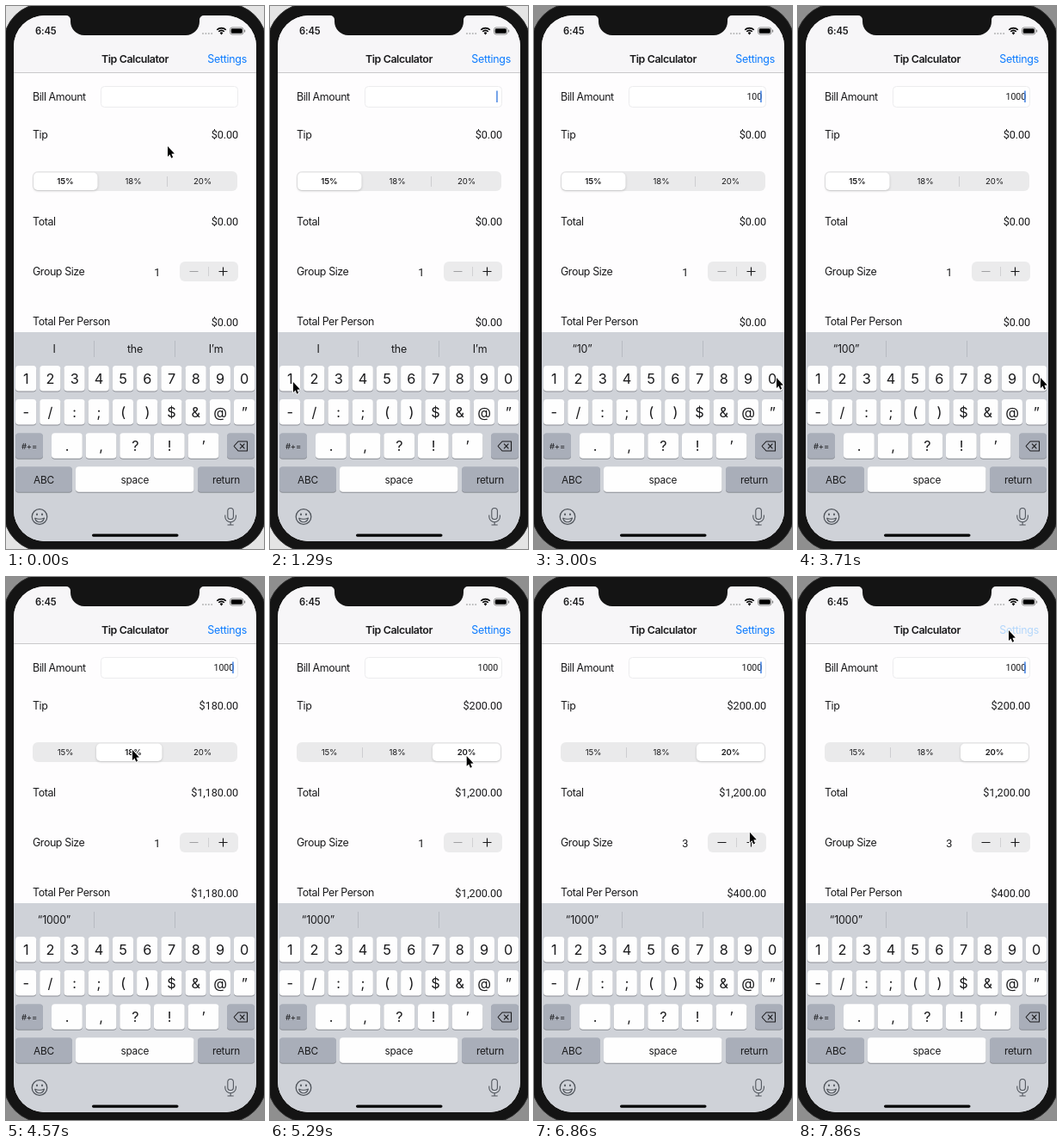
An HTML page with a canvas for the animation above (8 s loop, 300 px wide and 631 px high).

```html
<!DOCTYPE html>
<html lang="en">
<head>
<meta charset="utf-8">
<title>Tip Calculator</title>
<style>
html, body { margin: 0; width: 100%; height: 100%; overflow: hidden; background: #fff; }
canvas { display: block; width: 300px; height: 631px; }
</style>
</head>
<body>
<canvas id="stage"></canvas>
<script>
const W = 300, H = 631, LOOP = 8000, STEP = LOOP / 56;
const canvas = document.getElementById('stage');
const dpr = window.devicePixelRatio || 1;
canvas.width = W * dpr;
canvas.height = H * dpr;
const ctx = canvas.getContext('2d');

const INK = '#1a1a1c', BLUE = '#0a7aff', GREY_KEY = '#a9aeb9', BEZEL = '#141414';
const WORDS = 'Inter, Roboto, sans-serif';
const DIGITS = 'Roboto, Inter, sans-serif';

// Pointer stops: time, x, y
const PATH = [
  [0, 188, 163], [640, 188, 163], [1200, 27, 437], [1640, 27, 437],
  [2240, 282, 430], [2700, 282, 432], [3860, 282, 432], [4330, 147, 201],
  [4660, 147, 201], [4960, 228, 205], [5240, 228, 205], [5680, 251, 303],
  [6800, 251, 303], [7400, 248, 60], [7571, 247, 52], [7720, 245, 62]
];
const BILL = [[0, ''], [1500, '1'], [2430, '10'], [3000, '100'], [3560, '1000']];
const HINTS = [
  [0, ['I', 'the', 'I’m']], [1710, ['“1”']], [2720, ['“10”']],
  [3290, ['“100”']], [3950, ['“1000”']]
];
const RATES = [[0, 0], [4430, 0.18], [5140, 0.2]];
const GROUP = [[0, 1], [5850, 2], [6500, 3]];
const CHOICE = [[0, 0], [4290, 1], [5000, 2]];
const THUMBS = [[32, 106.5], [105, 181.5], [189, 268]];
const SLIDE = 240;

const clamp = v => Math.max(0, Math.min(1, v));
const ease = v => v * v * (3 - 2 * v);
const mix = (a, b, k) => a + (b - a) * k;
const lastIndex = (list, t) => list.filter(e => e[0] <= t).length - 1;
const valueAt = (list, t) => list[lastIndex(list, t)][1];
const money = v => '$' + v.toLocaleString('en-US', { minimumFractionDigits: 2, maximumFractionDigits: 2 });

function box(x, y, w, h, r, fill, stroke) {
  ctx.beginPath();
  ctx.roundRect(x, y, w, h, r);
  if (fill) { ctx.fillStyle = fill; ctx.fill(); }
  if (stroke) { ctx.strokeStyle = stroke; ctx.lineWidth = 1; ctx.stroke(); }
}

// y is the middle of the capital letters
function text(str, x, y, { size = 12.4, weight = 400, align = 'left', color = INK, track = -0.032, font = WORDS } = {}) {
  ctx.font = `${weight} ${size}px ${font}`;
  ctx.letterSpacing = track * size + 'px';
  ctx.textAlign = align;
  ctx.fillStyle = color;
  ctx.fillText(str, x, y + size * 0.36);
}

const number = (str, x, y, size = 12.7) =>
  text(str, x, y, { size, align: 'right', track: -0.008, font: DIGITS });

function line(color, width, ...pts) {
  ctx.beginPath();
  pts.forEach(([x, y]) => ctx.lineTo(x, y));
  ctx.strokeStyle = color;
  ctx.lineWidth = width;
  ctx.stroke();
}

function drawBody(t) {
  ctx.fillStyle = t < 1420 ? '#e4e4e4' : '#8f8f8f';
  ctx.fillRect(0, 0, W, H);
  box(-3, -3, 306, 637, 47, BEZEL, '#333');
}

function drawNotch() {
  ctx.beginPath();
  ctx.moveTo(70, 10);
  ctx.lineTo(70, 11);
  ctx.arcTo(75, 11, 75, 16, 5);
  ctx.arcTo(75, 34, 91, 34, 16);
  ctx.arcTo(225, 34, 225, 18, 16);
  ctx.arcTo(225, 11, 230, 11, 5);
  ctx.lineTo(230, 10);
  ctx.fillStyle = BEZEL;
  ctx.fill();
}

function drawStatus() {
  text('6:45', 34, 29.3, { size: 11.2, weight: 600, track: -0.01 });
  for (let i = 0; i < 4; i++) box(228 + i * 3.4, 31, 2, 2, 1, '#b4b4b6');
  ctx.strokeStyle = '#000';
  ctx.lineWidth = 1.7;
  for (const r of [4.6, 7.4]) {
    ctx.beginPath();
    ctx.arc(250.5, 33, r, -Math.PI * 0.75, -Math.PI * 0.25);
    ctx.stroke();
  }
  ctx.beginPath();
  ctx.moveTo(250.5, 33.4);
  ctx.arc(250.5, 33, 2.6, -Math.PI * 0.75, -Math.PI * 0.25);
  ctx.fillStyle = '#000';
  ctx.fill();
  box(260.5, 25, 15.5, 8, 2.4, null, '#8c8c8c');
  box(261.7, 26.2, 13.1, 5.6, 1.4, '#000');
  box(277, 27.5, 1.2, 3, 0.6, '#8c8c8c');
}

function drawNav(t) {
  ctx.fillStyle = '#f7f6f8';
  ctx.fillRect(9, 11, 282, 66);
  ctx.fillStyle = '#c9c9cb';
  ctx.fillRect(9, 77, 282, 1);
  drawStatus();
  text('Tip Calculator', 150, 61.3, { weight: 600, align: 'center' });
  text('Settings', 280, 61.3, { align: 'right', color: t < 7700 ? BLUE : '#b4d7fb', track: -0.02 });
}

function drawField(t) {
  box(110.5, 93.5, 159, 24, 4, '#fff', '#ececee');
  number(valueAt(BILL, t), 265, 105.3, 10.6);
  const typed = lastIndex(BILL, t);
  const start = typed ? BILL[typed][0] : 330;
  const phase = (t - start + 120 + 1000) % 1000;
  ctx.globalAlpha = clamp(Math.min(phase / 80, (680 - phase) / 120));
  ctx.fillStyle = '#3f7fe0';
  ctx.fillRect(263.2, 98.5, 1.5, 13.5);
  ctx.globalAlpha = 1;
}

function drawSegments(t) {
  box(31, 192, 238, 23, 6, '#eaeaeb');
  const i = lastIndex(CHOICE, t);
  const from = THUMBS[Math.max(0, i - 1)], to = THUMBS[i];
  const k = i ? ease(clamp((t - CHOICE[i][0]) / SLIDE)) : 1;
  const left = mix(from[0], to[0], k), right = mix(from[1], to[1], k);
  if (i === 2) line('#cdcdd0', 1, [107.5, 198], [107.5, 210]);
  if (i === 0) line('#cdcdd0', 1, [187.5, 198], [187.5, 210]);
  ctx.save();
  ctx.shadowColor = 'rgba(0,0,0,.18)';
  ctx.shadowBlur = 3 * dpr;
  ctx.shadowOffsetY = dpr;
  box(left, 193.5, right - left, 20.5, 5, '#fff');
  ctx.restore();
  ['15%', '18%', '20%'].forEach((s, n) =>
    text(s, [69, 148, 228.5][n], 204, { size: 9.6, weight: n === i ? 600 : 400, align: 'center', track: -0.01 }));
}

function drawStepper(t, count) {
  box(202, 297, 68, 23, 6, '#ebebec');
  const pressed = (t > 5800 && t < 6090) || (t > 6420 && t < 6700);
  if (pressed) box(235.5, 297, 34.5, 23, 6, '#c3c3c5');
  else line('#d0d0d2', 1, [235.5, 303], [235.5, 314]);
  line(count > 1 ? INK : '#a0a0a2', 1.2, [213.5, 308.5], [223.5, 308.5]);
  line(INK, 1.2, [247.5, 308.5], [257.5, 308.5]);
  line(INK, 1.2, [252.5, 303.5], [252.5, 313.5]);
}

function drawForm(t) {
  const rate = valueAt(RATES, t), count = valueAt(GROUP, t);
  const tip = 1000 * rate, total = rate ? 1000 + tip : 0;
  const row = (label, y, amount) => {
    text(label, 31, y);
    if (amount !== undefined) number(money(amount), 270, y);
  };
  row('Bill Amount', 105.6);
  row('Tip', 149.4, tip);
  row('Total', 250.9, total);
  row('Group Size', 309);
  row('Total Per Person', 367, total / count);
  number(String(count), 179.2, 309);
  drawField(t);
  drawSegments(t);
  drawStepper(t, count);
}

function key(x, y, w, label, fill = '#fefefe', size = 16.3) {
  box(x, y + 1, w, 29.5, 3.8, '#8b8e95');
  box(x, y, w, 29.5, 3.8, fill);
  text(label, x + w / 2, y + 15, { size, align: 'center', track: -0.02 });
}

function drawBackspace() {
  ctx.lineJoin = 'round';
  line(INK, 1.1, [265, 511.5], [270, 506], [280.5, 506], [280.5, 517], [270, 517], [265, 511.5]);
  line(INK, 1.1, [272, 508.7], [277.4, 514.3]);
  line(INK, 1.1, [277.4, 508.7], [272, 514.3]);
}

function drawBottomIcons() {
  ctx.strokeStyle = ctx.fillStyle = '#50555c';
  ctx.lineWidth = 1.3;
  ctx.beginPath();
  ctx.arc(39, 593.5, 8.8, 0, 7);
  ctx.stroke();
  for (const x of [36, 42]) {
    ctx.beginPath();
    ctx.ellipse(x, 590.8, 1, 1.4, 0, 0, 7);
    ctx.fill();
  }
  ctx.beginPath();
  ctx.moveTo(33.5, 595);
  ctx.quadraticCurveTo(39, 597.6, 44.5, 595);
  ctx.quadraticCurveTo(43, 599.8, 39, 599.8);
  ctx.quadraticCurveTo(35, 599.8, 33.5, 595);
  ctx.lineWidth = 1.1;
  ctx.stroke();

  box(257.8, 583.5, 6.6, 13, 3.3);
  ctx.stroke();
  ctx.beginPath();
  ctx.moveTo(254.8, 591.5);
  ctx.lineTo(254.8, 593.5);
  ctx.arc(261.1, 593.5, 6.3, Math.PI, 0, true);
  ctx.lineTo(267.4, 591.5);
  ctx.stroke();
  line('#50555c', 1.1, [261.1, 599.8], [261.1, 603]);
  line('#50555c', 1.1, [257.5, 603], [264.7, 603]);
}

function drawKeyboard(t) {
  ctx.fillStyle = '#cfd2d8';
  ctx.fillRect(9, 379, 282, 243);
  valueAt(HINTS, t).forEach((s, i) => text(s, 56 + i * 94, 398.1, { align: 'center', track: -0.015 }));
  for (const x of [102.5, 196.5]) line('#b7bbc2', 1, [x, 389], [x, 408]);
  ['1234567890', '-/:;()$&@”'].forEach((keys, r) =>
    [...keys].forEach((c, i) => key(11 + i * 28.22, 418 + r * 39, 24.2, c)));
  [...'.,?!’'].forEach((c, i) => key(53 + i * 39.65, 496.3, 35.8, c));
  key(11, 496.3, 32, '#+=', GREY_KEY, 9.5);
  key(257, 496.3, 32, '', GREY_KEY);
  drawBackspace();
  key(11, 535.3, 66, 'ABC', GREY_KEY, 11.8);
  key(81, 535.3, 137.5, 'space', '#fefefe', 11.8);
  key(223, 535.3, 66, 'return', GREY_KEY, 11.8);
  drawBottomIcons();
  box(100, 613.5, 100.5, 3.2, 1.6, '#000');
}

function drawPointer(t) {
  const i = lastIndex(PATH, t);
  const a = PATH[i], b = PATH[i + 1] || a;
  const k = b === a ? 0 : ease((t - a[0]) / (b[0] - a[0]));
  ctx.save();
  ctx.translate(mix(a[1], b[1], k), mix(a[2], b[2], k));
  ctx.scale(0.85, 0.9);
  ctx.beginPath();
  [[0, 0], [0, 13.2], [3, 10.5], [5, 15.2], [7.2, 14.2], [5.2, 9.7], [9.3, 9.4]]
    .forEach(p => ctx.lineTo(...p));
  ctx.closePath();
  ctx.lineJoin = 'round';
  ctx.strokeStyle = '#fff';
  ctx.lineWidth = 2;
  ctx.stroke();
  ctx.fillStyle = '#000';
  ctx.fill();
  ctx.restore();
}

function draw(t) {
  ctx.setTransform(dpr, 0, 0, dpr, 0, 0);
  drawBody(t);
  ctx.save();
  ctx.beginPath();
  ctx.roundRect(9, 11, 282, 611, 36);
  ctx.clip();
  ctx.fillStyle = '#fefdfe';
  ctx.fillRect(9, 11, 282, 611);
  drawNav(t);
  drawForm(t);
  drawKeyboard(t);
  ctx.restore();
  drawNotch();
  drawPointer(t);
}

function tick(now) {
  draw(Math.floor((now % LOOP + 6) / STEP) * STEP % LOOP);
  requestAnimationFrame(tick);
}
tick(performance.now());
</script>
</body>
</html>
```
